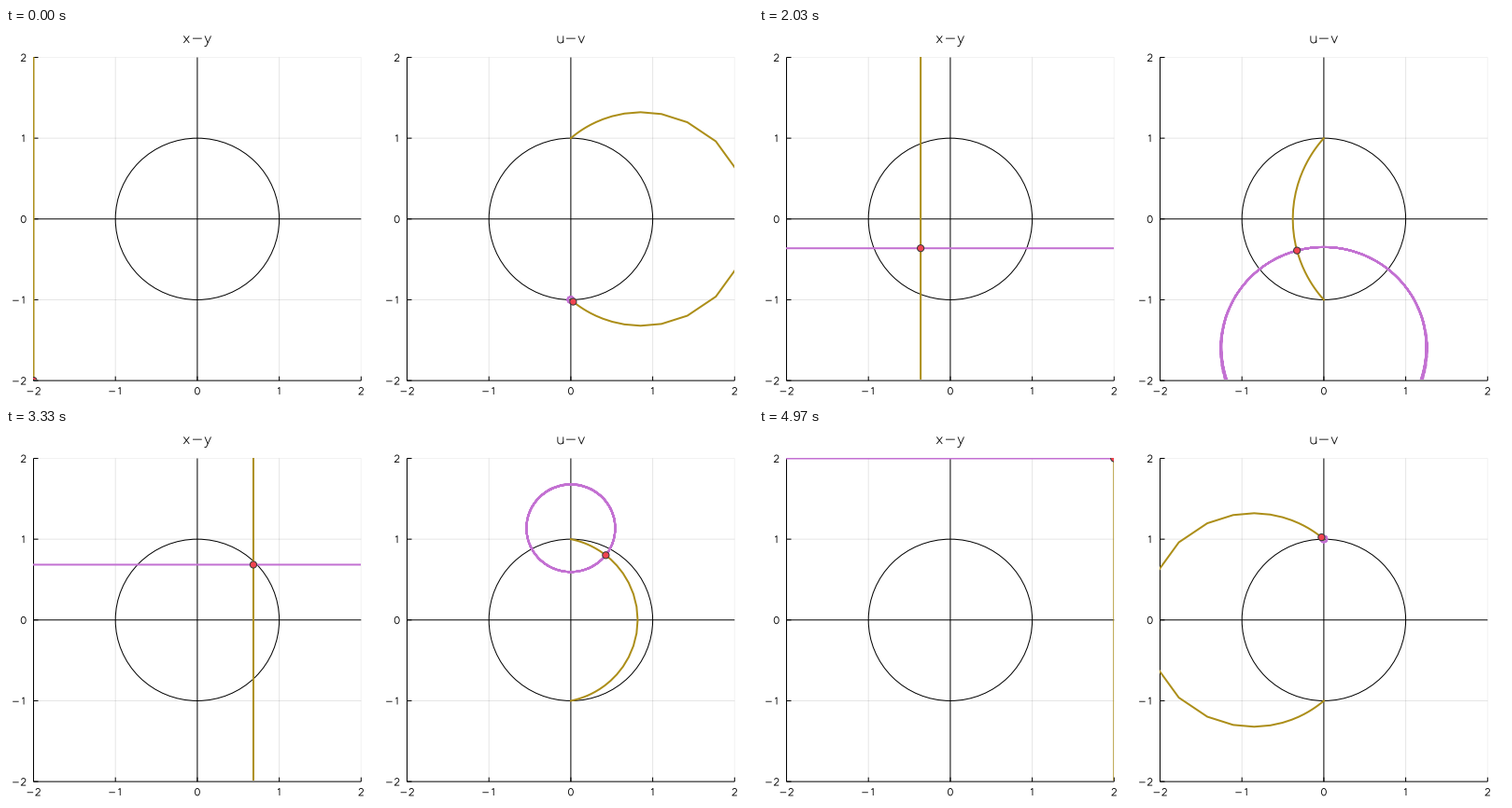
Write a matplotlib script that moves like this. It is 800 px wide and 400 px high and loops after 5010 ms.

```python
import numpy as np
import matplotlib
import matplotlib.pyplot as plt
from matplotlib.animation import FuncAnimation
from matplotlib.collections import LineCollection
from matplotlib.patches import Circle, Ellipse, Rectangle

matplotlib.rcParams["path.simplify"] = False

W, H, DPI = 800, 400, 100
PX = 72 / DPI                      # one pixel in points
TICK_MS, LOOP_MS = 10, 5010
STEPS = 150                        # poses at 30 per second
LEFT, GAP = 29.5, 400              # first panel's left edge, panel spacing
TOP, PW, PH = 31.5, 350.8, 346.6
UX, UY = PW / 4, PH / 4
PURPLE, OLIVE, RED = "#c371d2", "#ac8e18", "#f04450"


def arc(cx, cy, rx, ry, start, end):
    a = np.radians(np.linspace(start, end, 17))
    return list(zip(cx + rx * np.cos(a), cy + ry * np.sin(a)))


# Plotter-style strokes, 21 units to a digit's height
STROKES = {
    "0": [arc(10, 10.5, 7, 10.5, 90, 450)],
    "1": [[(6, 17), (11, 21), (11, 0)]],
    "2": [arc(10, 15, 6, 6, 170, -35) + [(3, 0), (17, 0)]],
    "-": [[(4, 9), (22, 9)]],
    "x": [[(3, 14), (14, 0)], [(14, 14), (3, 0)]],
    "y": [[(2, 14), (8, 0)], [(14, 14), (5, -6), (1, -7)]],
    "u": [[(4, 14)] + arc(9.5, 5, 5.5, 5, 180, 360), [(15, 14), (15, 0)]],
    "v": [[(2, 14), (8, 0), (14, 14)]],
}


def advance(c):
    return 26 if c == "-" else 20 if c.isdigit() else 17


def text_strokes(text, x, base, scale, anchor):
    """Strokes of text; anchor 0.5 centres it on x, 1 ends it at x."""
    x -= anchor * scale * sum(map(advance, text))
    out = []
    for c in text:
        out += [[(x + scale * a, base - scale * b) for a, b in s]
                for s in STROKES[c]]
        x += scale * advance(c)
    return out


def to_px(left, z):
    return left + (np.real(z) + 2) * UX, TOP + (2 - np.imag(z)) * UY


fig = plt.figure(figsize=(W / DPI, H / DPI), dpi=DPI, facecolor="white")
ax = fig.add_axes([0, 0, 1, 1])
ax.set(xlim=(0, W), ylim=(H, 0))
ax.axis("off")


def add_lines(segs, color, width=1.0):
    ax.add_collection(LineCollection(segs, colors=[color], zorder=1,
                                     linewidths=width * PX, snap=False),
                      autolim=False)


class Panel:
    def __init__(self, left, title, func):
        self.left, self.func = left, func
        self.draw_frame(title)
        clip = Rectangle((left - 0.5, TOP - 0.5), PW + 0.5, PH - 0.6,
                         transform=ax.transData)
        self.across, self.upright = (
            ax.plot([], [], color=c, lw=2 * PX, zorder=3, snap=False,
                    solid_joinstyle="round")[0] for c in (PURPLE, OLIVE))
        self.dot = ax.add_patch(Circle((0, 0), 3.6, fc=RED, ec="#383838",
                                       lw=PX, zorder=4))
        self.artists = [self.across, self.upright, self.dot]
        for art in self.artists:
            art.set_clip_path(clip)

    def draw_frame(self, title):
        left, right, bottom = self.left, self.left + PW, TOP + PH
        cx, cy = to_px(left, 0)
        axes, labels = [], text_strokes(title, cx, 16, 0.54, 0.5)
        for v in range(-2, 3):
            x, y = to_px(left, v + 1j * v)
            cross = [[(x, TOP), (x, bottom)], [(left, y), (right, y)]]
            if v in (-2, 0):
                axes += cross
            else:
                add_lines(cross, (0, 0, 0, 0.1 if abs(v) == 1 else 0.05))
            axes += [[(x, bottom), (x, bottom - 4.5)],
                     [(left, y), (left + 5, y)]]
            labels += text_strokes(str(v), x, 393, 0.36, 0.5)
            labels += text_strokes(str(v), left - 7.2, y + 4, 0.36, 1)
        add_lines(axes, "black")
        add_lines(labels, "black", 0.85)
        ax.add_patch(Ellipse((cx, cy), 2 * UX, 2 * UY, fill=False,
                             ec="black", lw=PX, zorder=2))

    def pose(self, s):
        self.across.set_data(*to_px(self.left, self.func(SPAN + 1j * s)))
        self.upright.set_data(*to_px(self.left, self.func(s + 1j * SPAN)))
        self.dot.center = to_px(self.left, self.func(s + 1j * s))


SPAN = np.linspace(-10, 10, 201)
panels = [Panel(LEFT, "x-y", np.positive), Panel(LEFT + GAP, "u-v", np.tan)]


def update(k):
    step = min(int(0.3 * k + 0.15), STEPS - 1)
    for panel in panels:
        panel.pose(-2 + 4 * step / (STEPS - 1))
    return [art for panel in panels for art in panel.artists]


anim = FuncAnimation(fig, update, frames=LOOP_MS // TICK_MS,
                     interval=TICK_MS, repeat=True, repeat_delay=0)
plt.show()
```
